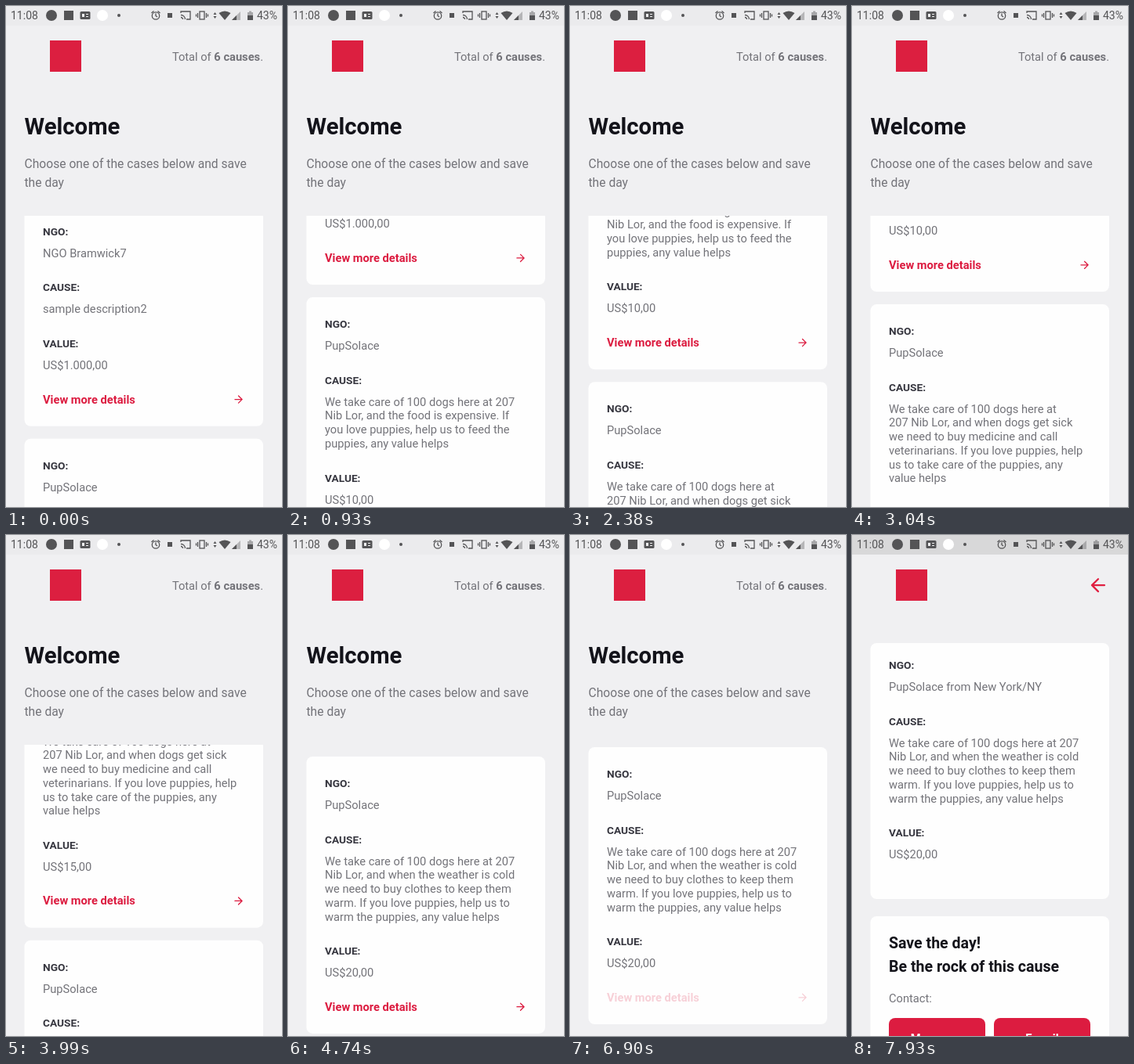
Animation, 352 px wide and 640 px high, one loop 8 s. Source, as an HTML page:

```html
<!DOCTYPE html>
<html lang="en">
<head>
<meta charset="utf-8">
<title>Causes</title>
<style>
  html, body { margin: 0; width: 100%; height: 100%; overflow: hidden; background: #f0f0f2; }
  svg { display: block; width: 352px; height: 640px; font-family: Roboto, sans-serif; }
  .label { font-size: 13.7px; font-weight: 700; fill: #36363f; }
  .value { font-size: 14.67px; fill: #737379; }
  .link { font-size: 14.67px; font-weight: 700; }
  .intro { font-size: 15.65px; fill: #737379; }
  .welcome { font-size: 29.3px; font-weight: 700; fill: #13131a; }
  .hero { font-size: 19.56px; font-weight: 700; fill: #13131a; }
  .button { font-size: 14.67px; font-weight: 700; fill: #fff; text-anchor: middle; }
  .status { font-size: 14px; fill: #545456; }
</style>
</head>
<body>
<svg viewBox="0 0 352 640">
  <defs>
    <clipPath id="view"><rect y="268" width="352" height="372"/></clipPath>
    <g id="brand"><rect x="56" y="44" width="40" height="40" fill="#dc1f40"/></g>
  </defs>

  <g id="home">
    <rect width="352" height="640" fill="#f0f0f2"/>
    <use href="#brand"/>
    <text class="value" x="328" y="70" text-anchor="end">Total of <tspan font-weight="700">6 causes</tspan>.</text>
    <text class="welcome" x="23.5" y="164.3">Welcome</text>
    <text class="intro" x="23.5" y="207">Choose one of the cases below and save</text>
    <text class="intro" x="23.5" y="230.5">the day</text>
    <g clip-path="url(#view)"><g id="list"></g></g>
  </g>

  <g id="detail">
    <rect width="352" height="700" fill="#f0f0f2"/>
    <use href="#brand"/>
    <path d="M19 12H5M12 19l-7-7 7-7" transform="translate(300.3 50.5) scale(1.14)"
      fill="none" stroke="#e02041" stroke-width="2" stroke-linecap="round" stroke-linejoin="round"/>
  </g>

  <rect id="shade" width="352" height="25"/>
  <g fill="#545456">
    <text class="status" x="6" y="17">11:08</text>
    <circle cx="58" cy="12" r="7"/>
    <rect x="74" y="6" width="12" height="12"/>
    <rect x="94.5" y="7" width="13" height="10" rx="1.5"/>
    <path d="M97 10h3v4h-3zM102 10h3v1h-3zM102 13h3v1h-3z" fill="#f0f0f2"/>
    <circle cx="123" cy="12" r="7" fill="#fff"/>
    <circle cx="144" cy="12" r="2"/>
    <g fill="none" stroke="#545456" stroke-width="1.3">
      <circle cx="191" cy="12.5" r="4.7"/>
      <path d="M191 9.5v3l2 1.5M185.500 9l3-2.5M196.500 9l-3-2.5"/>
      <path d="M223 9V7h12v10h-5M223 11.5a5.5 5.5 0 0 1 5.5 5.5M223 14.5a2.5 2.5 0 0 1 2.5 2.5"/>
      <rect x="247" y="7" width="6" height="10"/>
      <path d="M244.5 9v6M255.5 9v6M242.5 10.5v3M257.5 10.5v3"/>
    </g>
    <rect x="206" y="9" width="6" height="6"/>
    <path d="M264.5 11l2-3 2 3zM264.5 13l2 3 2-3z"/>
    <path d="M271.5 9q7.5-5 15 0l-7.5 9z"/>
    <path d="M299 7v11h-11z" opacity=".35"/>
    <path d="M294 12v6h-6z"/>
    <path d="M308 8h2V6.5h3V8h2v10h-7z" opacity=".45"/>
    <path d="M308 12h7v6h-7z"/>
    <text class="status" x="320" y="17">43%</text>
  </g>
</svg>

<script>
const $ = id => document.getElementById(id);
const list = $('list'), detail = $('detail'), shade = $('shade');
const LINE = 17.75, RED = '#dc1c40';

function add(parent, tag, attrs, content = '') {
  const el = document.createElementNS('http://www.w3.org/2000/svg', tag);
  for (const k in attrs) el.setAttribute(k, attrs[k]);
  el.textContent = content;
  parent.append(el);
  return el;
}
const text = (parent, cls, x, y, str) => add(parent, 'text', { class: cls, x, y }, str);
const box = (parent, y, height) =>
  add(parent, 'rect', { x: 23.5, y, width: 304.5, height, rx: 8, fill: '#fefefe' });

// Writes the three labelled fields; returns the baseline of the row after them.
function fields(parent, y, ngo, cause, value) {
  [['NGO:', [ngo]], ['CAUSE:', cause], ['VALUE:', [value]]].forEach(([label, lines]) => {
    text(parent, 'label', 47, y, label);
    lines.forEach((s, i) => text(parent, 'value', 47, y + 28 + i * LINE, s));
    y += 71.6 + (lines.length - 1) * LINE;
  });
  return y;
}

const winter = ['We take care of 100 dogs here at 207', 'Nib Lor, and when the weather is cold',
  'we need to buy clothes to keep them', 'warm. If you love puppies, help us to',
  'warm the puppies, any value helps'];
const causes = [
  ['NGO Bramwick7', ['sample description2'], 'US$1.000,00'],
  ['PupSolace', ['We take care of 100 dogs here at 207', 'Nib Lor, and the food is expensive. If',
    'you love puppies, help us to feed the', 'puppies, any value helps'], 'US$10,00'],
  ['PupSolace', ['We take care of 100 dogs here at', '207 Nib Lor, and when dogs get sick',
    'we need to buy medicine and call', 'veterinarians. If you love puppies, help',
    'us to take care of the puppies, any', 'value helps'], 'US$15,00'],
  ['PupSolace', winter, 'US$20,00']
];

let cardTop = 0, link;
for (const cause of causes) {
  const height = 283 + (cause[1].length - 1) * LINE;
  box(list, cardTop, height);
  const y = fields(list, cardTop + 39, ...cause);
  link = add(list, 'g', { fill: RED });
  text(link, 'link', 47, y, 'View more details');
  add(link, 'path', { d: 'M5 12h14M12 5l7 7-7 7', fill: 'none', stroke: RED, 'stroke-width': 2,
    'stroke-linecap': 'round', transform: `translate(288.7 ${y - 12.8}) scale(.65)` });
  cardTop += height + 16;
}

box(detail, 138, 327);
fields(detail, 171, 'PupSolace from New York/NY', winter, 'US$20,00');
box(detail, 487, 240);
text(detail, 'hero', 47, 528, 'Save the day!');
text(detail, 'hero', 47, 557.5, 'Be the rock of this cause');
text(detail, 'value', 47, 597, 'Contact:');
[[47, 'Messages'], [181, 'E-mail']].forEach(([x, s]) => {
  add(detail, 'rect', { x, y: 617, width: 123, height: 49, rx: 8, fill: RED });
  text(detail, 'button', x + 61.5, 647.5, s);
});

// Scroll keys: time, list position, speed.
const keys = [[0, 254, -.19], [1780, -83, -.17], [3040, -270, -.18],
  [3990, -521, -.33], [4740, -756, -.08], [5040, -768, 0]];

function scrollAt(t) {
  const i = keys.findIndex(k => k[0] > t);
  if (i < 0) return -768;
  const [t0, p0, v0] = keys[i - 1], [t1, p1, v1] = keys[i];
  const d = t1 - t0, u = (t - t0) / d, w = 1 - u;
  return w * w * ((1 + 2 * u) * p0 + u * d * v0) + u * u * ((3 - 2 * u) * p1 - w * d * v1);
}
const ramp = (t, from, to) => Math.min(1, Math.max(0, (t - from) / (to - from)));

function draw() {
  const t = performance.now() % 8000;
  list.setAttribute('transform', `translate(0 ${scrollAt(t)})`);

  // The pressed link dims, then the detail screen rises over the list.
  link.setAttribute('opacity', 1 - .8 * (ramp(t, 6780, 6900) - ramp(t, 7090, 7340)));
  const rise = 1 - (1 - ramp(t, 7300, 7720)) ** 4, fade = ramp(t, 7300, 7560);
  detail.setAttribute('transform', `translate(0 ${51 * (1 - rise)})`);
  detail.setAttribute('opacity', fade);
  shade.setAttribute('opacity', .02 + .08 * fade);
  requestAnimationFrame(draw);
}
draw();
</script>
</body>
</html>
```
